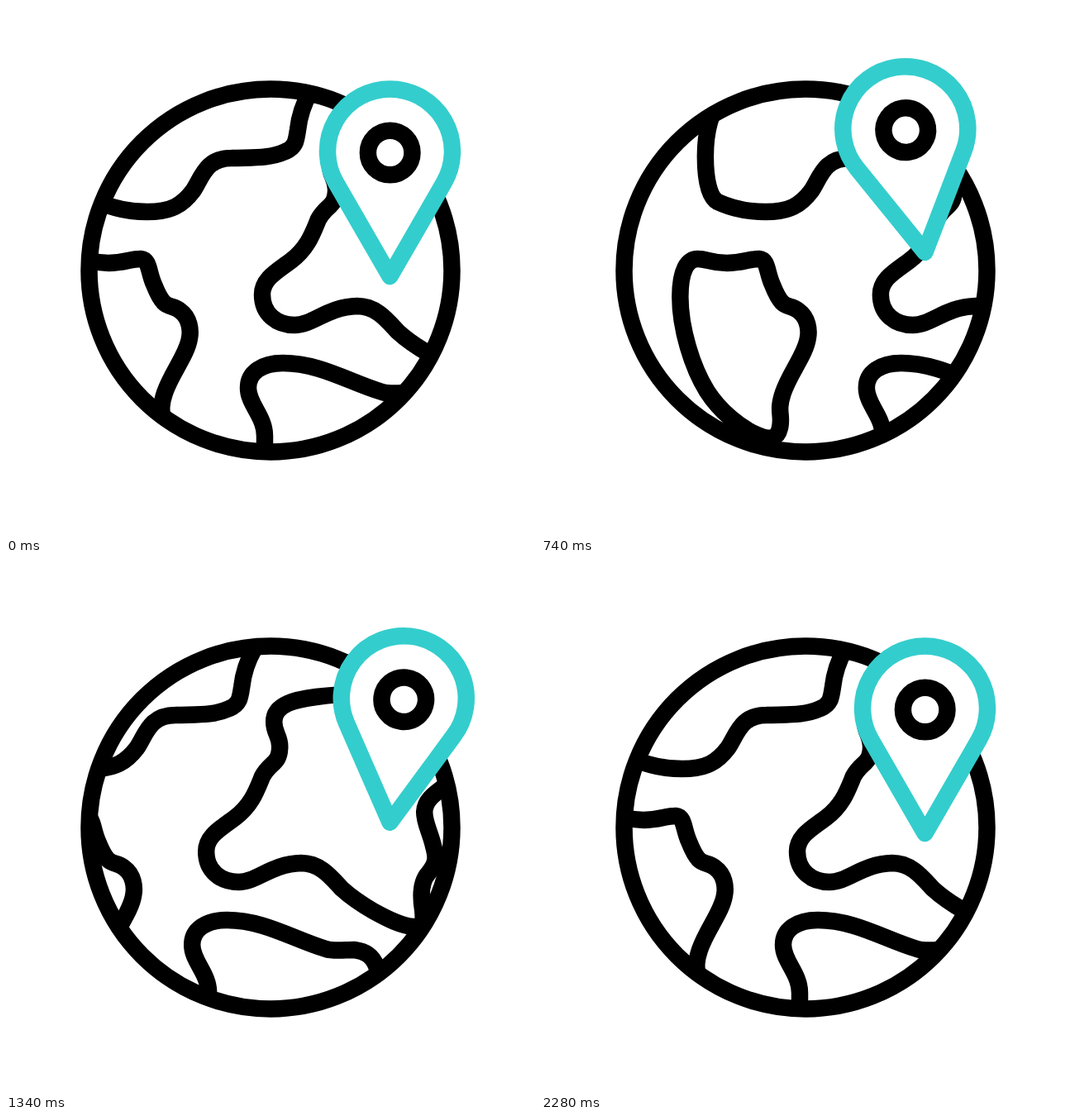
An HTML page without scripts for the animation above (2400 ms loop, 640 px wide and 640 px high).

```html
<!DOCTYPE html>
<html lang="en">
<head>
<meta charset="utf-8">
<title>Spinning globe with pin</title>
<style>
  html, body { margin: 0; width: 100%; height: 100%; overflow: hidden; background: #fff; }
  svg { display: block; width: 100%; height: 100%; }

  .line { fill: none; stroke: #000; stroke-width: 20.5; stroke-linecap: round; stroke-linejoin: round; }
  .teal { fill: #fff; stroke: #34cdcd; }

  .map, .pin {
    animation: 2400ms infinite;
    animation-timing-function: cubic-bezier(.3642, 0, .6358, 1);
  }
  .map { animation-name: spin; }
  .pin {
    animation-name: hop, sway;
    transform-origin: 464.5px 327px;
  }

  /* wind up, one full turn, overshoot, settle */
  @keyframes spin {
    0% { translate: 0; }
    19.2% { translate: -72px; }
    65.08% { translate: 1069px; }
    89.6%, 100% { translate: 1027px; }
  }
  @keyframes hop {
    0%, 21.25% { translate: 0 0; }
    44.58% { translate: 0 -80px; animation-timing-function: cubic-bezier(.5, 1, .89, 1); }
    63.6%, 100% { translate: 0 0; }
  }
  @keyframes sway {
    0%, 21.96% { rotate: 0deg; }
    44.58% { rotate: -26.8deg; }
    60% { rotate: 13deg; }
    68.75% { rotate: -6.4deg; }
    77.9% { rotate: 3.8deg; }
    87.1% { rotate: -2deg; }
    95%, 100% { rotate: 0deg; }
  }
</style>
</head>
<body>
<svg viewBox="0 0 640 640">
  <defs>
    <clipPath id="disc"><circle cx="320" cy="320" r="229"/></clipPath>
    <g id="land">
      <!-- north-west -->
      <path d="M123 92C109 125 98 140 98 182C98 210 103 232 113 237C128 244 148 249 171 249C200 249 213 241 226 224C237 208 241 184 273 184C298 183 318 185 338 176C350 171 351 164 353 150C355 132 360 118 368 104L376 88"/>
      <!-- south-west -->
      <path d="M89 306C100 306 104 311 124 311C144 311 150 306 163 306C174 307 172 322 179 337C193 372 198 358 211 369C222 377 224 392 222 402C219 422 200 444 192 468C184 492 192 494 188 511C185 524 176 524 166 521C140 512 114 488 100 466C82 437 67.5 390 67.5 352C67.5 320 76 306 89 306Z"/>
      <!-- east -->
      <path d="M443 162C420 165 392 170 392 192C392 207 400 209 399 224C398 244 388 240 378 258C371 275 365 293 345 308C328 321 310 330 310 349C310 373 328 386 349 386C372 386 388 364 425 363C448 363 461 380 474 394C486 405 500 414 512 421C530 431 546 439 561 440C574 441 573 432 572 420C569 402 570 385 579 375C590 362 588 354 585 343C581 325 574 315 574 301C575 280 600 273 617 255C627 246 629 226 624 204C617 175 594 157 575 157C530 157 480 157 443 162Z"/>
      <!-- south -->
      <path d="M313 550V520C313 496 293 482 293 462C293 443 310 432 335 432C380 432 415 455 455 467C464 470 478 468 489 468C503 470 511 475 516 488C520 500 518 520 512 550"/>
    </g>
  </defs>

  <g class="line">
    <g clip-path="url(#disc)">
      <g class="map">
        <use href="#land"/>
        <use href="#land" x="-1027"/>
      </g>
    </g>
    <circle cx="320" cy="320" r="219.5"/>
    <g class="pin">
      <path class="teal" d="M464.5 327L399.1 213.7A75.5 75.5 0 1 1 529.9 213.7Z"/>
      <circle cx="464.7" cy="177.5" r="26.8"/>
    </g>
  </g>
</svg>
</body>
</html>
```
